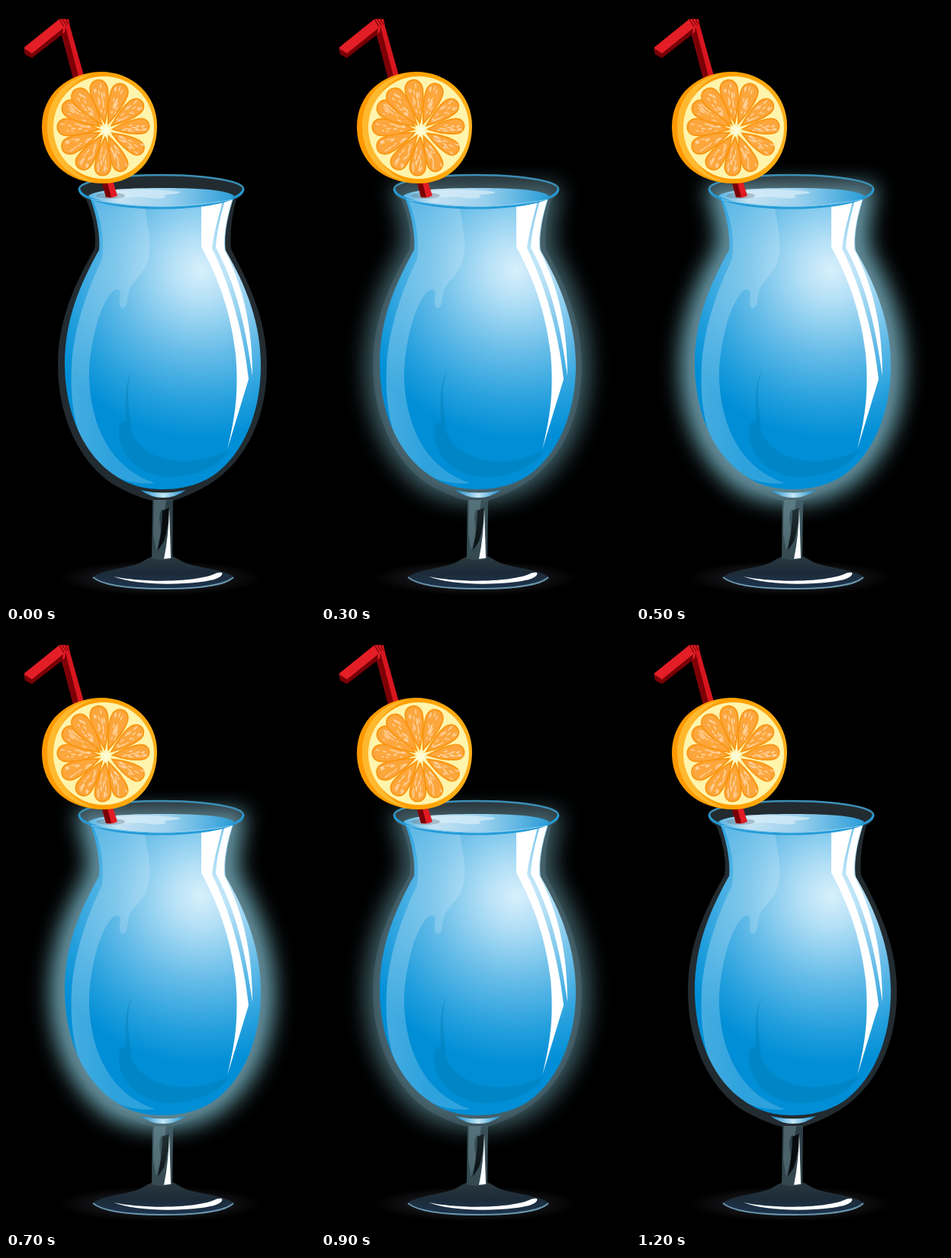
Animation of 405x782 px, one loop 1300 ms. Source, as an HTML page:

```html
<!DOCTYPE html>
<html lang="en">
<head>
<meta charset="utf-8">
<title>Blue cocktail</title>
<style>
html, body { margin: 0; width: 100%; height: 100%; overflow: hidden; background: #000; }
svg { display: block; width: 100vw; height: 100vh; }
</style>
</head>
<body>
<svg viewBox="0 0 405 782" preserveAspectRatio="none">
  <defs>
    <path id="goblet" d="M95 239A108.500 19 0 0 1 312 239C312 246 308 250 302 253C296 272 293 302 295 318C322 369 342 414 342 470C342 535 317 592 270 623C250 636 234 642 219 647H192C174 643 155 634 138 624C91 591 68 530 68 470C68 413 88 367 116 318C119 300 114 273 105 253C99 250 95 246 95 239Z"/>
    <path id="halo" d="M104 244H303C296 272 293 302 295 318C322 369 342 414 342 470C342 535 317 592 270 623C250 634 230 640 206 640S160 636 138 624C91 591 68 530 68 470C68 413 88 367 116 318C119 300 114 273 104 244Z"/>
    <path id="drink" d="M110 251C118 271 124 299 122 319C98 362 77 409 77 468C77 528 99 583 140 612C162 628 183 632 206 632C230 632 252 627 273 613C312 585 334 530 334 470C334 415 315 366 288 320C285 304 290 275 298 252C270 268 140 268 110 251Z"/>
    <clipPath id="inDrink"><use href="#drink"/></clipPath>
    <clipPath id="inStem"><path d="M192 646H219L218 724H191Z"/></clipPath>
    <filter id="soft" filterUnits="userSpaceOnUse" x="0" y="140" width="405" height="600" color-interpolation-filters="sRGB">
      <feGaussianBlur stdDeviation="14"/>
    </filter>
    <radialGradient id="blue" gradientUnits="userSpaceOnUse" cx="256" cy="345" r="222">
      <stop offset="0" stop-color="#d8f0fc"/>
      <stop offset=".18" stop-color="#b4e0f6"/>
      <stop offset=".5" stop-color="#66bce8"/>
      <stop offset=".8" stop-color="#239fdd"/>
      <stop offset="1" stop-color="#008ed6"/>
    </radialGradient>
    <linearGradient id="sheen">
      <stop offset="0" stop-color="#fff" stop-opacity=".27"/>
      <stop offset=".5" stop-color="#fff" stop-opacity=".18"/>
    </linearGradient>
    <linearGradient id="surface">
      <stop offset="0" stop-color="#55b4e2"/>
      <stop offset=".2" stop-color="#c5e2f2"/>
      <stop offset=".55" stop-color="#9bd1ee"/>
      <stop offset="1" stop-color="#2a9dd8"/>
    </linearGradient>
    <linearGradient id="lens">
      <stop offset="0" stop-color="#1487c4"/>
      <stop offset=".5" stop-color="#c4e8f8"/>
      <stop offset="1" stop-color="#1487c4"/>
    </linearGradient>
    <linearGradient id="stem" x2="0" y2="1">
      <stop offset="0" stop-color="#2b3d44"/>
      <stop offset="1" stop-color="#354950"/>
    </linearGradient>
    <linearGradient id="stemLight" x2="0" y2="1">
      <stop offset="0" stop-color="#9bdeea" stop-opacity=".25"/>
      <stop offset="1" stop-color="#9bdeea" stop-opacity="0"/>
    </linearGradient>
    <linearGradient id="foot" x2="0" y2="1">
      <stop offset="0" stop-color="#2c3a40"/>
      <stop offset=".5" stop-color="#1c2b38"/>
      <stop offset="1" stop-color="#1d3450"/>
    </linearGradient>
    <radialGradient id="shade">
      <stop offset=".5" stop-color="#19191d"/>
      <stop offset="1" stop-color="#19191d" stop-opacity="0"/>
    </radialGradient>
    <linearGradient id="rind">
      <stop offset="0" stop-color="#ff9800"/>
      <stop offset=".5" stop-color="#ffa000"/>
      <stop offset="1" stop-color="#ffb01c"/>
    </linearGradient>
  </defs>

  <rect width="405" height="782"/>
  <g id="glow">
    <use href="#halo" fill="#8fdcee" stroke="#8fdcee" stroke-width="20" filter="url(#soft)"/>
  </g>

  <!-- foot and stem -->
  <ellipse cx="202" cy="748" rx="134" ry="23" fill="url(#shade)"/>
  <path d="M114 747C124 737 163 735 178 727C188 721 193 718 206 718C219 718 223 722 232 727C250 735 290 737 298 747C290 757 254 763 206 763C158 763 124 757 114 747Z" fill="url(#foot)"/>
  <path d="M114 747C126 757 159 762 206 762S288 757 298 747" fill="none" stroke="#6a97ad" stroke-width="1.800"/>
  <path d="M141 746C173 753 237 755 270 744C276 741 280 740 283 741C285 745 278 750 263 752C223 758 169 757 141 746Z" fill="#fff"/>
  <path d="M192 646H219L218 722Q205 727 191 722Z" fill="url(#stem)"/>
  <g clip-path="url(#inStem)">
    <path d="M194 646H210L208 660Q202 654 201 670L203 690L197 712L193 690Z" fill="#4b626a"/>
    <path d="M205 660L214 656Q213 682 207 700L199 712Q205 682 205 660Z" fill="#080c0f"/>
    <path d="M214 656L216 722L207 723Q213 695 214 656Z" fill="#fff"/>
  </g>
  <path id="stemGlow" d="M192 646H219L218 724H191Z" fill="url(#stemLight)"/>

  <!-- bowl -->
  <use href="#goblet" fill="#5e7985" fill-opacity=".36"/>
  <path d="M176 633Q206 640 236 633Q222 643 206 643T176 633Z" fill="url(#lens)"/>
  <use href="#drink" fill="url(#blue)"/>
  <g clip-path="url(#inDrink)">
    <path d="M112 250L182 262C185 288 190 300 188 322C185 350 166 357 161 373C158 387 159 394 153 395C147 393 149 384 150 376C149 369 144 370 139 374C121 392 108 451 109 488C112 551 137 604 195 624C155 628 119 608 102 574C88 545 84 508 86 470C89 421 106 372 126 331C129 307 126 278 112 250Z" fill="url(#sheen)"/>
    <path d="M166 475C155 500 162 528 164 557C179 591 230 610 292 581C282 602 246 617 211 616C172 613 146 585 148 553C149 545 153 540 157 546C157 520 154 496 166 475Z" fill="#0079a8" fill-opacity=".36"/>
    <path d="M256 258V315C277 354 294 396 301 455C305 503 301 535 290 580L318 488C311 425 293 363 270 317C273 292 280 273 284 254Z" fill="#fff"/>
    <path d="M287 254C281 275 276 296 275 316C302 365 314 420 323 484C323 421 312 369 286 318C285 296 290 275 297 252Z" fill="#fff"/>
  </g>

  <!-- rim and surface -->
  <path d="M108 248C117 241 151 238 204 238S290 241 299 248C292 259 255 264 204 264S115 259 108 248Z" fill="url(#surface)"/>
  <path d="M128 246C155 237 208 240 228 243C228 247 210 245 207 248C216 251 198 253 182 250C160 249 143 253 128 246Z" fill="#d9eef9" fill-opacity=".7"/>
  <path d="M96 239A107.500 18 0 0 1 311 239" fill="none" stroke="#3b8fb5" stroke-width="2.500"/>
  <path d="M96 239A107.500 25 0 0 0 311 239" fill="none" stroke="#249bd7" stroke-width="3"/>
  <path d="M112 253Q204 271 296 253" fill="none" stroke="#8dcef0" stroke-width="1.200"/>

  <!-- straw -->
  <ellipse cx="137" cy="248" rx="19" ry="4" fill="#56697a" opacity=".35"/>
  <path d="M125 228L139 226L146 248Q139 252 131 250Z" fill="#e01b24"/>
  <path d="M125 228L132 227L138 250L131 250Z" fill="#790006"/>
  <path d="M70 19L82 17L84 27L102 91L88 94L73 37Z" fill="#d7161f"/>
  <path d="M72 31L78 27L95 92L88 94Z" fill="#7c0006"/>
  <path d="M24 54L70 17L79 17L77 34L34 67L25 63Z" fill="#e31e26"/>
  <path d="M25 56L34 62L75 29L74 37L34 68L25 63Z" fill="#780006"/>
  <path d="M70 17L76 27M73 16L79 25M77 16L82 24" stroke="#720006" stroke-width="1.200"/>

  <!-- orange slice -->
  <path d="M124 86C167 86 198 117 198 157C198 202 168 232 128 232C80 232 47 202 47 158C47 116 80 87 124 86Z" fill="url(#rind)"/>
  <path d="M116 88C78 93 54 121 54 158C54 196 80 226 117 230C85 221 64 193 64 159C64 124 84 98 116 88Z" fill="#ffb92e"/>
  <ellipse cx="128" cy="159" rx="66" ry="67" fill="#fff4ac"/>
  <g id="pulp"></g>
  <path d="M131 153L133 159L139 158L135 163L139 168L133 166L131 172L128 166L122 168L127 162L123 157L129 159Z" fill="#fffbd5"/>
</svg>
<script>
const $ = id => document.getElementById(id);

let seed = 7;
const random = () => (seed = seed * 16807 % 2147483647) / 2147483647;

const hub = { x: 131, y: 162 };
const flesh = { x: 127.5, y: 159, rx: 60.5, ry: 63 };

// Distance from the hub to the edge of the flesh along an angle.
function reach(angle) {
  const c = Math.cos(angle) / flesh.rx, s = Math.sin(angle) / flesh.ry;
  const u = (hub.x - flesh.x) / flesh.rx, v = (hub.y - flesh.y) / flesh.ry;
  const a = c * c + s * s, b = c * u + s * v;
  return (-b + Math.sqrt(b * b - a * (u * u + v * v - 1))) / a;
}

function wedge(degrees) {
  const r = reach(degrees * Math.PI / 180), w = r * 0.172;
  const n = v => v.toFixed(1);
  const outline = `M9 0C${n(r * .35)} ${n(-w * .5)} ${n(r * .6)} ${n(-w)} ${n(r * .8)} ${n(-w)}` +
    `C${n(r * 1.06)} ${n(-w)} ${n(r * 1.06)} ${n(w)} ${n(r * .8)} ${n(w)}` +
    `C${n(r * .6)} ${n(w)} ${n(r * .35)} ${n(w * .5)} 9 0Z`;
  let flecks = '';
  for (let i = 0; i < 15; i++) {
    const x = r * (0.3 + random() * 0.55);
    const y = (random() - 0.5) * 1.5 * w * Math.min(1, x / r * 1.15);
    const length = 4 + random() * 6, tilt = y / x * length;
    flecks += `M${n(x)} ${n(y)}q${n(length / 2)} ${n(tilt / 2 - 1.8)} ${n(length)} ${n(tilt)}q${n(-length / 2)} ${n(2 - tilt / 2)} ${n(-length)} ${n(-tilt)}Z`;
  }
  return `<g transform="translate(${hub.x} ${hub.y}) rotate(${degrees})">` +
    `<path d="${outline}" fill="#fca63c" stroke="#f99510" stroke-width="1.8"/>` +
    `<path d="${flecks}" fill="#ffd09a"/></g>`;
}

$('pulp').innerHTML = [-100, -70, -38, -6, 30, 67, 95, 125, 156, 184, 211, 232].map(wedge).join('');

// The glow rises in six hard steps and falls in six.
function draw(time) {
  const step = Math.floor(time % 1300 / 100);
  const level = 1 - Math.abs(step - 6) / 6;
  $('glow').setAttribute('opacity', level * 0.86);
  $('stemGlow').setAttribute('opacity', level);
}

const start = performance.now();
function tick() {
  draw(performance.now() - start);
  requestAnimationFrame(tick);
}
draw(0);
requestAnimationFrame(tick);
</script>
</body>
</html>
```
